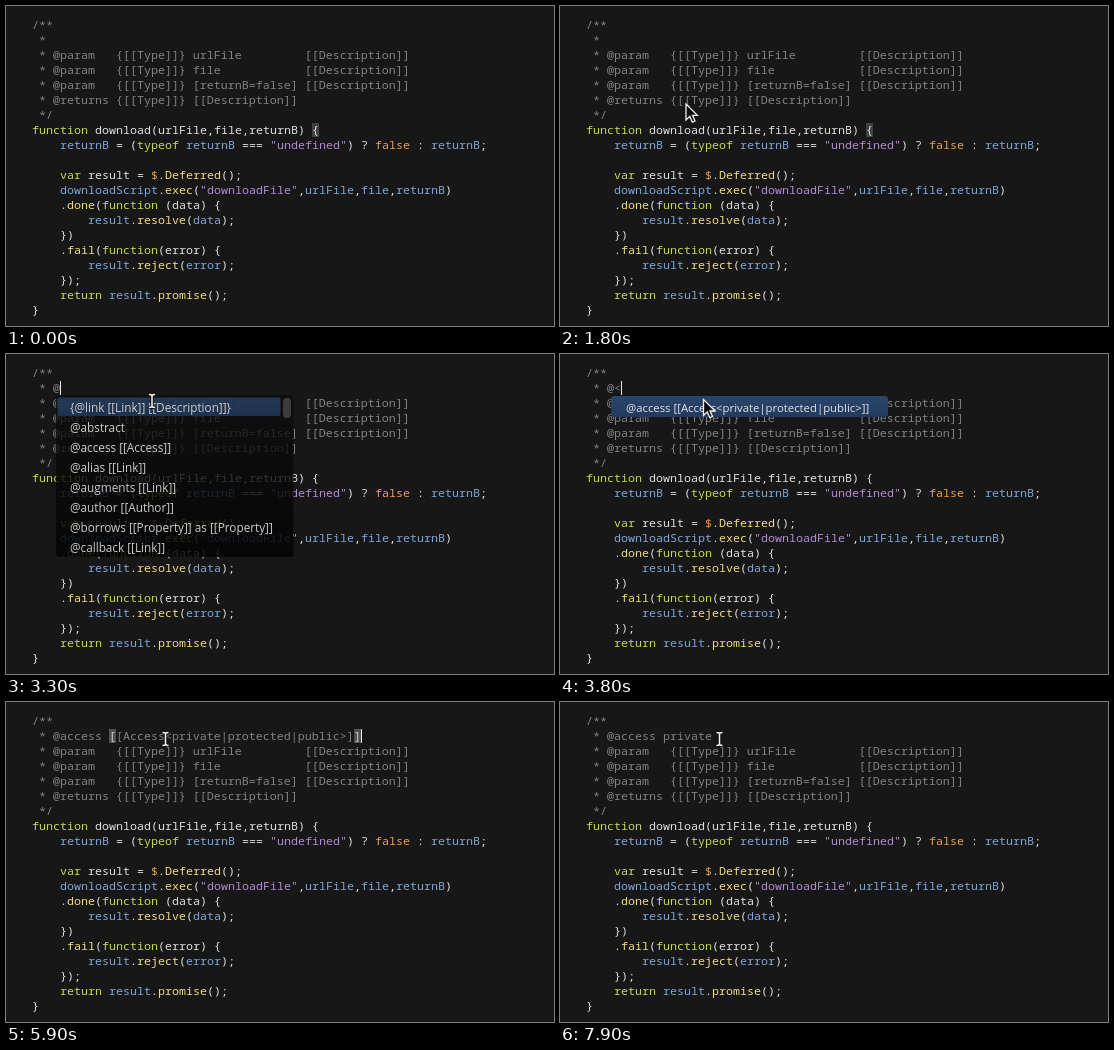
Recreate the animation shown at these times as an HTML page with a canvas. Size 548 px wide and 320 px high, loop 8000 ms.

```html
<!DOCTYPE html>
<html lang="en">
<head>
<meta charset="utf-8">
<title>Doc comment hints</title>
<style>
html, body { margin: 0; width: 548px; height: 320px; overflow: hidden; background: #171717; }
canvas { display: block; }
</style>
</head>
<body>
<canvas id="stage" width="548" height="320"></canvas>
<script>
const ctx = document.getElementById('stage').getContext('2d');
const LOOP = 8000, LEFT = 26, CELL = 7, ROW = 15;
const MONO = '11.667px "Noto Sans Mono", monospace';
const SANS = '"Open Sans", sans-serif';
const COLOR = {
  bg: '#171717', comment: '#828282', plain: '#e0e0e0', keyword: '#c6d857',
  variable: '#7ea6d8', property: '#eedc82', atom: '#e5a04c', string: '#b18bd3'
};
// Times of the edits to the comment
const CLICK = 2400, SPACE = 2900, AT = 3200, ANGLE = 3600, ACCEPT = 4250, RETYPE = 7400;

const params = ['urlFile        ', 'file           ', '[returnB=false]']
  .map(p => ` * @param   {[[Type]]} ${p} [[Description]]`);
const lines = [
  '/**', ' *', ...params, ' * @returns {[[Type]]} [[Description]]', ' */',
  'function download(urlFile,file,returnB) {',
  '    returnB = (typeof returnB === "undefined") ? false : returnB;',
  '',
  '    var result = $.Deferred();',
  '    downloadScript.exec("downloadFile",urlFile,file,returnB)',
  '    .done(function (data) {',
  '        result.resolve(data);',
  '    })',
  '    .fail(function(error) {',
  '        result.reject(error);',
  '    });',
  '    return result.promise();',
  '}'
];
const hints = [
  '{@link [[Link]] [[Description]]}', '@abstract', '@access [[Access]]',
  '@alias [[Link]]', '@augments [[Link]]', '@author [[Author]]',
  '@borrows [[Property]] as [[Property]]', '@callback [[Link]]'
];
const snippet = '@access [[Access<private|protected|public>]]';

// Pointer stops: time, x, y
const stops = [
  [400, 460, 275], [1000, 400, 222], [1700, 126, 98], [2150, 126, 98],
  [2400, 146, 47], [3400, 146, 47], [3500, 143.5, 45.5], [5200, 143.5, 45.5],
  [5500, 159.5, 37], [LOOP, 159.5, 37]
];

const colX = col => LEFT + col * CELL;

function box(x, y, w, h, fill, radius = 0) {
  ctx.fillStyle = fill;
  ctx.beginPath();
  ctx.roundRect(x, y, w, h, radius);
  ctx.fill();
}

function write(text, x, y, fill, font) {
  ctx.font = font;
  ctx.fillStyle = fill;
  ctx.fillText(text, x, y);
}

function shade(y0, y1, from, to) {
  const gradient = ctx.createLinearGradient(0, y0, 0, y1);
  gradient.addColorStop(0, from);
  gradient.addColorStop(1, to);
  return gradient;
}

function editedLine(t) {
  if (t < SPACE) return ' *';
  if (t < AT) return ' * ';
  if (t < ANGLE) return ' * @';
  if (t < ACCEPT) return ' * @<';
  if (t < RETYPE) return ' * ' + snippet;
  return ' * @access ' + 'private'.slice(0, 1 + (t - RETYPE) / 35);
}

function tokenColor(word, before, declares) {
  if (word[0] === '"') return COLOR.string;
  if (/^(function|typeof|var|return)$/.test(word)) return COLOR.keyword;
  if (word === 'false' || word === '$') return COLOR.atom;
  if (!/\w/.test(word)) return COLOR.plain;
  if (before === '.') return COLOR.property;
  return declares ? COLOR.plain : COLOR.variable;
}

function drawLine(text, row) {
  const y = 23 + row * ROW;
  if (row < 7) return write(text, LEFT, y, COLOR.comment, MONO);
  const declares = /function|var/.test(text);
  for (const m of text.matchAll(/"[^"]*"|\w+|[^\w\s]/g))
    write(m[0], colX(m.index), y, tokenColor(m[0], text[m.index - 1], declares), MONO);
}

function highlight(col, row, fill) {
  box(colX(col), 12 + row * ROW, CELL, 14, fill);
}

function drawList() {
  box(50, 41, 237.5, 162, shade(41, 203, 'rgba(12,12,12,.74)', 'rgba(4,4,4,.88)'), 3);
  ctx.save();
  ctx.clip();
  box(51.5, 43.5, 223, 18.5, shade(43, 62, 'rgba(44,72,112,.7)', 'rgba(34,58,94,.8)'), 2);
  hints.forEach((hint, i) => write(hint, 64, 58 + i * 20, '#cdcdcd', '11.75px ' + SANS));
  box(277, 44, 8, 20, '#3c3c3c', 4);
  ctx.restore();
}

function drawSingleHint() {
  box(51, 42, 277, 21, shade(42, 63, '#2b456c', '#223a5e'), 3);
  write(snippet, 66, 58, '#e4e4e4', '11.35px ' + SANS);
}

function pointerAt(t) {
  const i = stops.findIndex(s => s[0] > t);
  const [t0, x0, y0] = stops[i - 1], [t1, x1, y1] = stops[i];
  const p = (t - t0) / (t1 - t0), k = p * p * (3 - 2 * p);
  return [x0 + (x1 - x0) * k, y0 + (y1 - y0) * k];
}

function drawBeam() {
  const path = new Path2D('M-3-6.5Q0-6.5 0-5Q0-6.5 3-6.5M0-5V5M-3 6.5Q0 6.5 0 5Q0 6.5 3 6.5');
  for (const [color, width] of [['#111', 3.5], ['#f4f4f4', 1.5]]) {
    ctx.strokeStyle = color;
    ctx.lineWidth = width;
    ctx.stroke(path);
  }
}

function drawArrow() {
  const path = new Path2D('M0 0V16L3.8 12.4L6.3 18.2L9 17L6.5 11.3H11.4Z');
  ctx.fillStyle = '#0b0b0b';
  ctx.strokeStyle = '#f2f2f2';
  ctx.lineWidth = 1.3;
  ctx.fill(path);
  ctx.stroke(path);
}

function drawPointer(t) {
  if (t < stops[0][0]) return;
  ctx.save();
  ctx.translate(...pointerAt(t));
  const beam = t >= 2250 && t < 3450 || t >= 5350;
  beam ? drawBeam() : drawArrow();
  ctx.restore();
}

function draw(t) {
  box(0, 0, 548, 320, COLOR.bg);
  const edited = editedLine(t);
  const expanded = edited.endsWith(']');
  if (t < CLICK) highlight(40, 7, '#414141');
  if (expanded) [11, 46].forEach(col => highlight(col, 1, '#505050'));
  lines.forEach((text, row) => drawLine(row === 1 ? edited : text, row));
  if (expanded) [11, 46].forEach(col =>
    write(edited[col], colX(col), 38, '#c4c4c4', MONO));
  if (t >= CLICK && t < 7800) box(colX(edited.length), 27, 1, 14, '#e8e8e8');
  if (t >= AT && t < ANGLE) drawList();
  if (t >= ANGLE && t < ACCEPT) drawSingleHint();
  drawPointer(t);
}

const start = performance.now();
function tick() {
  draw((performance.now() - start) % LOOP);
  requestAnimationFrame(tick);
}
tick();
</script>
</body>
</html>
```
